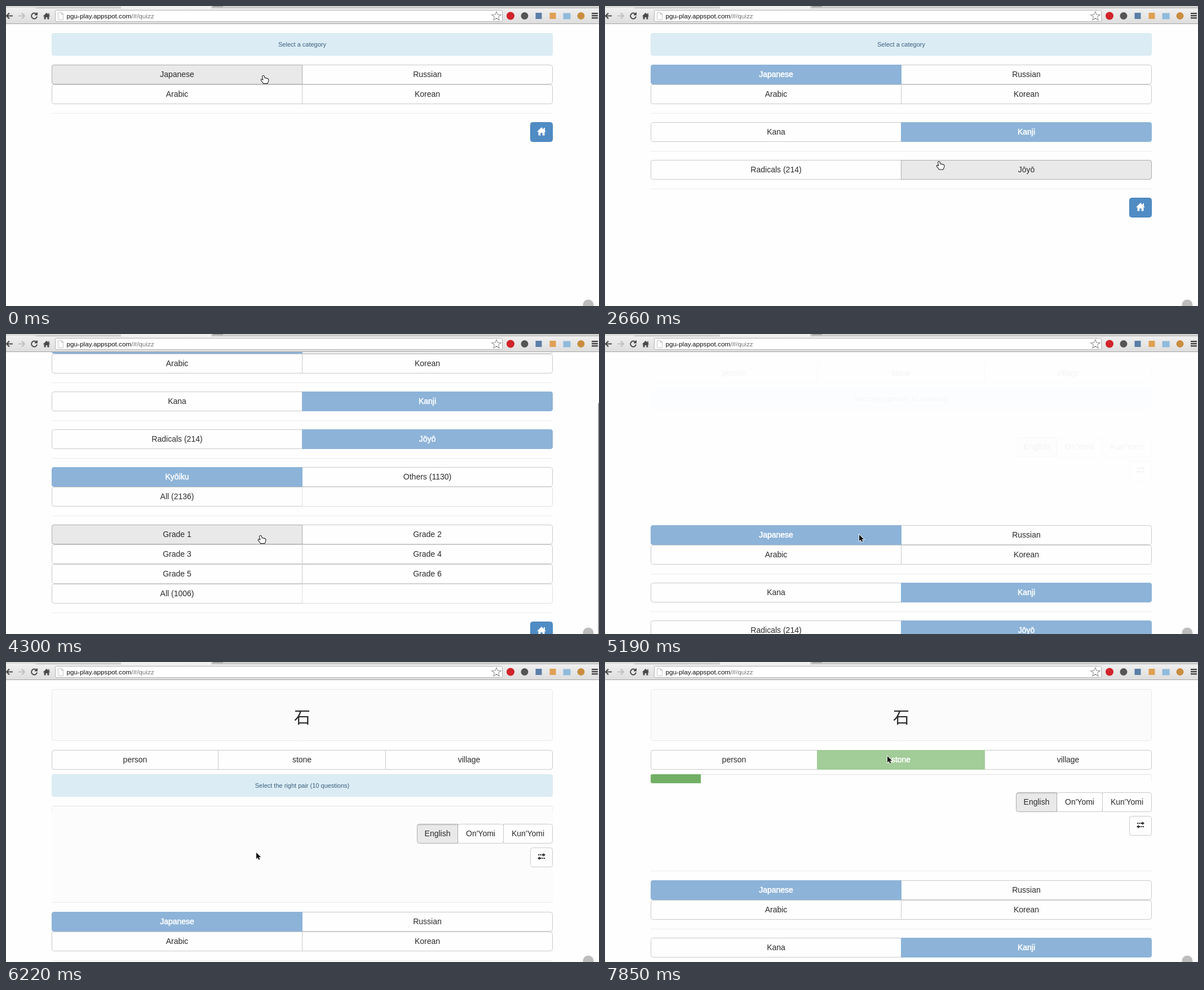
These frames come from a looping animation (1052x532 px, 8 s). An HTML page with a canvas:

```html
<!DOCTYPE html>
<html lang="en">
<head>
<meta charset="utf-8">
<title>Quiz</title>
<style>
  html, body { margin: 0; width: 100%; height: 100%; overflow: hidden; background: #fefefe; }
  canvas { display: block; }
</style>
</head>
<body>
<canvas id="stage" width="1052" height="532"></canvas>
<script>
const ctx = document.getElementById('stage').getContext('2d');
const LOOP = 8000, TICK = 148.15;
const LEFT = 81, RIGHT = 970, ROW = 35, GAP = 16;
const BLUE = '#8db3d8', GREEN = '#a2cc98', INK = '#2a2a2a';

// Each level appears over `start`..`start + 1` ticks; `pick` is chosen at tick `at`.
const levels = [
  { items: ['Japanese', 'Russian', 'Arabic', 'Korean'], start: -1, pick: 'Japanese', at: 1 },
  { items: ['Kana', 'Kanji'], start: 0.5, pick: 'Kanji', at: 11 },
  { items: ['Radicals (214)', 'Jōyō'], start: 10.5, pick: 'Jōyō', at: 21 },
  { items: ['Kyōiku', 'Others (1130)', 'All (2136)', ''], start: 20, pick: 'Kyōiku', at: 27 },
  { items: ['Grade 1', 'Grade 2', 'Grade 3', 'Grade 4', 'Grade 5', 'Grade 6', 'All (1006)', ''],
    start: 26.5, pick: 'Grade 1', at: 33 }
];

// Motion tracks: [tick, value...]
const pointerTrack = [
  [4, 457, 123], [9, 597, 225], [14, 597, 225], [19, 592, 288], [23, 592, 288],
  [25, 456, 341], [26, 452, 357], [33, 452, 357], [34, 451, 356], [41, 451, 356],
  [42, 444, 338], [43, 390, 266], [44, 372, 213], [45, 372, 213], [46, 384, 188],
  [47, 412, 170], [48, 427, 163], [50, 501, 167]
];
const scrollTrack = [[27, 0], [28, 70], [29, 104], [35, 104], [36, 88], [37, 51], [38, 14], [39, 0]];
const quizTrack = [[34, 0], [35, 0.05], [36, 0.2], [37, 0.45], [38, 0.75], [39, 1]];
const progressTrack = [[51, 0], [53, 89]];

const shapes = {
  hand: new Path2D('M-2 1Q-1-1 .6.5L2 4.6Q3.4 3.5 4.4 4.8Q6 4 6.7 5.4Q8.6 5 8.5 7.2L8 10L6.5 13H0L-2.5 9.7L-4.3 7.4Q-4 5.4-2 7L-.5 7.8Z'),
  arrow: new Path2D('M0 0V11.2L2.6 8.8L4.4 12.8L6.4 12L4.7 8H8.2Z'),
  house: new Path2D('M-8 1L0-7L4-3V-6H6V-1L8 1H5.5V7.5H1.7V3H-1.7V7.5H-5.5V1Z'),
  swap: new Path2D('M-6-4H-4V-2H-6ZM-3-4H-1V-2H-3ZM0-4H3V-6L7-3L3 0V-2H0ZM6 2H4V4H6ZM3 2H1V4H3ZM0 2H-3V0L-7 3L-3 6V4H0Z'),
  back: new Path2D('M6 0H-5M0-5L-5 0L0 5'),
  reload: new Path2D('M4-3A5 5 0 1 0 5 1M5-6V-2H1'),
  star: new Path2D('M0-7L2-2L7-2L3 1L4.5 6L0 3L-4.5 6L-3 1L-7-2L-2-2Z'),
  sheet: new Path2D('M-4.5-6H1.5L4.5-3V6H-4.5ZM1.5-6V-3H4.5')
};

let pointer, overButton;

function track(points, tick) {
  const next = points.findIndex(p => p[0] > tick);
  if (next === 0) return points[0].slice(1);
  if (next < 0) return points[points.length - 1].slice(1);
  const a = points[next - 1], b = points[next];
  const k = (tick - a[0]) / (b[0] - a[0]);
  return a.slice(1).map((v, i) => v + (b[i + 1] - v) * k);
}

function rect(x, y, w, h, fill) {
  ctx.fillStyle = fill;
  ctx.fillRect(x, y, w, h);
}

function box(x, y, w, h, fill, border, radius) {
  ctx.beginPath();
  ctx.roundRect(x + 0.5, y + 0.5, w - 1, h - 1, radius);
  ctx.fillStyle = fill;
  ctx.fill();
  ctx.lineWidth = 1;
  ctx.strokeStyle = border;
  ctx.stroke();
}

function disc(x, y, r, fill) {
  ctx.beginPath();
  ctx.arc(x, y, r, 0, 7);
  ctx.fillStyle = fill;
  ctx.fill();
}

function text(str, x, y, size, fill, align = 'center') {
  ctx.font = `${size}px "Liberation Sans", Arial, sans-serif`;
  ctx.textAlign = align;
  ctx.fillStyle = fill;
  ctx.fillText(str, x, y);
}

function icon(name, x, y, fill, stroke, width = 1) {
  ctx.save();
  ctx.translate(x, y);
  if (stroke) {
    ctx.strokeStyle = stroke;
    ctx.lineWidth = width;
    ctx.stroke(shapes[name]);
  }
  if (fill) {
    ctx.fillStyle = fill;
    ctx.fill(shapes[name]);
  }
  ctx.restore();
}

const rule = y => rect(LEFT, y - 1, RIGHT - LEFT, 1, '#ebebeb');

function button(label, x, y, w, { radius = 4, chosen, pressed } = {}) {
  const inside = inset => pointer.x > x && pointer.x < x + w &&
    pointer.y >= y + inset && pointer.y < y + ROW - inset;
  const enabled = label && !chosen;
  if (enabled && inside(0)) overButton = true;
  const lit = pressed || (enabled && inside(2));
  const fill = chosen || (lit ? '#e9e9e9' : '#fefefe');
  const border = chosen || (lit ? '#adadad' : label ? '#c9c9c9' : '#dedede');
  box(x, y, w, ROW, fill, border, radius);
  if (pressed) rect(x + 2, y + 1, w - 4, 2, 'rgba(0,0,0,.08)');
  text(label, x + w / 2, y + 22, 14, chosen ? '#fff' : INK);
  if (chosen) {
    ctx.lineWidth = 0.5;
    ctx.strokeStyle = '#fff';
    ctx.strokeText(label, x + w / 2, y + 22);
  }
}

function buttonGrid(items, y, columns, pick, color) {
  const step = (RIGHT - LEFT) / columns;
  const drawCell = (label, i) => {
    const col = i % columns;
    const x = Math.round(LEFT + col * step) - (col ? 1 : 0);
    const end = Math.round(LEFT + (col + 1) * step);
    const l = col ? 0 : 4, r = col === columns - 1 ? 4 : 0;
    button(label, x, y + Math.floor(i / columns) * ROW, end - x,
      { radius: [l, r, r, l], chosen: label === pick && color });
  };
  items.forEach(drawCell);
  // Repaint a highlighted cell so that its border lies over its neighbours.
  items.forEach((label, i) => {
    const x = LEFT + (i % columns) * step, top = y + Math.floor(i / columns) * ROW;
    const hovered = pointer.x > x && pointer.x < x + step && pointer.y > top && pointer.y < top + ROW;
    if (label && (label === pick || hovered)) drawCell(label, i);
  });
}

function alertBox(label, y) {
  box(LEFT, y, RIGHT - LEFT, 40, '#dbecf4', '#d6e9f0', 3);
  text(label, 525.5, y + 24, 11, '#3b5f7e');
}

function drawQuiz(y, tick) {
  const answered = tick >= 51;
  box(LEFT, y, RIGHT - LEFT, 92, '#fbfbfb', '#e8e8e8', 4);
  ctx.font = '29px "Noto Sans CJK JP", "Noto Sans CJK", sans-serif';
  ctx.textAlign = 'center';
  ctx.fillStyle = INK;
  ctx.fillText('石', 525.5, y + 61);
  buttonGrid(['person', 'stone', 'village'], y + 108, 3, answered && 'stone', GREEN);
  y += 151;
  if (!answered) {
    alertBox('Select the right pair (10 questions)', y);
    y += 56;
    rect(LEFT, y + 1, RIGHT - LEFT, 171, '#fcfcfc');
  }
  rect(LEFT + 1, y, RIGHT - LEFT - 2, 1, '#e2e2e2');
  rect(LEFT, y + 1, 1, 13, '#eee');
  rect(RIGHT - 1, y + 1, 1, 13, '#eee');
  const done = track(progressTrack, tick)[0];
  if (done) {
    ctx.beginPath();
    ctx.roundRect(LEFT, y, done, 16, [3, 0, 0, 3]);
    ctx.fillStyle = '#71b064';
    ctx.fill();
  }
  y += 32;
  button("On'Yomi", 801, y, 82);
  button("Kun'Yomi", 882, y, 88, { radius: [0, 4, 4, 0] });
  button('English', 729, y, 73, { radius: [4, 0, 0, 4], pressed: true });
  box(930, y + 42, 40, ROW, '#fefefe', '#c9c9c9', 4);
  icon('swap', 950, y + 58, INK);
  rule(y + 140);
  return y + 156;
}

function drawPage(tick) {
  const scroll = Math.round(track(scrollTrack, tick)[0]);
  const quizAlpha = track(quizTrack, tick)[0];
  let y = 48 - scroll;
  if (quizAlpha) {
    ctx.globalAlpha = quizAlpha;
    y = drawQuiz(y, tick);
    ctx.globalAlpha = 1;
  } else {
    alertBox('Select a category', y);
    y += 56;
  }
  for (const level of levels) {
    const alpha = Math.min(1, tick - level.start);
    if (alpha <= 0) break;
    ctx.globalAlpha = alpha;
    buttonGrid(level.items, y, 2, tick >= level.at && level.pick, BLUE);
    y += level.items.length / 2 * ROW + GAP;
    rule(y + 1);
    y += GAP;
    ctx.globalAlpha = 1;
  }
  box(930, y, 40, ROW, '#508cc4', '#3f7db8', 4);
  icon('house', 950, y + 16, '#fff');
  if (scroll && !quizAlpha) rect(1050.5, 32 + scroll * 0.87, 1.5, 410, '#858585');
  disc(1033, 530, 9.5, '#bdbdbd');
}

function drawBrowser() {
  const shade = ctx.createLinearGradient(0, 3, 0, 31);
  shade.addColorStop(0, '#f0f0f0');
  shade.addColorStop(1, '#dedede');
  rect(0, 0, 1052, 31, shade);
  rect(0, 31, 1052, 1, '#a3a3a3');
  rect(0, 0, 204, 3, '#dadada');
  rect(364, 0, 688, 3, '#d2d2d2');
  rect(52, 3, 152, 1, '#b4b4b4');
  rect(364, 3, 688, 1, '#b4b4b4');
  rect(367, 0, 18, 2, '#a8a8a8');

  icon('back', 6, 17.5, null, '#4a4a4a', 2.2);
  ctx.save();
  ctx.translate(28, 17.5);
  ctx.scale(-1, 1);
  icon('back', 0, 0, null, '#bfbfbf', 2.2);
  ctx.restore();
  icon('reload', 50, 17.5, null, '#4a4a4a', 2);
  ctx.save();
  ctx.translate(72, 17.5);
  ctx.scale(0.8, 0.8);
  icon('house', 0, 0, '#4a4a4a');
  ctx.restore();

  box(87, 7, 794, 21, '#fff', '#b3b3b3', 2);
  icon('sheet', 97, 18, '#fff', '#8a8a8a');
  const host = 'pgu-play.appspot.com';
  text(host, 107.5, 22, 11.75, '#111', 'left');
  text('/#/quizz', 107.5 + ctx.measureText(host).width, 22, 11.75, '#777', 'left');
  icon('star', 870, 18, '#fff', '#777', 1.6);

  disc(895, 17.5, 7, '#d2232a');
  disc(920, 17.5, 6.5, '#555');
  rect(939.5, 12, 11, 11, '#5b7fa6');
  rect(964.5, 12, 11, 11, '#dfa052');
  rect(988.5, 12.5, 13, 11, '#8fbbdc');
  disc(1020, 17.5, 6.5, '#c98d3e');
  for (const y of [12, 16, 20]) rect(1039, y, 11, 2.4, '#444');
}

function draw(time) {
  const tick = Math.floor((time + 12) / TICK) % 54;
  const [x, y] = track(pointerTrack, tick);
  pointer = { x, y };
  overButton = false;
  rect(0, 0, 1052, 532, '#fefefe');
  drawPage(tick);
  drawBrowser();
  if (overButton) icon('hand', x, y + 1, '#fff', '#111', 2);
  else icon('arrow', x, y, '#111', '#fff', 1.6);
}

const startTime = performance.now();
function frame() {
  draw((performance.now() - startTime) % LOOP);
  requestAnimationFrame(frame);
}
frame();
</script>
</body>
</html>
```
